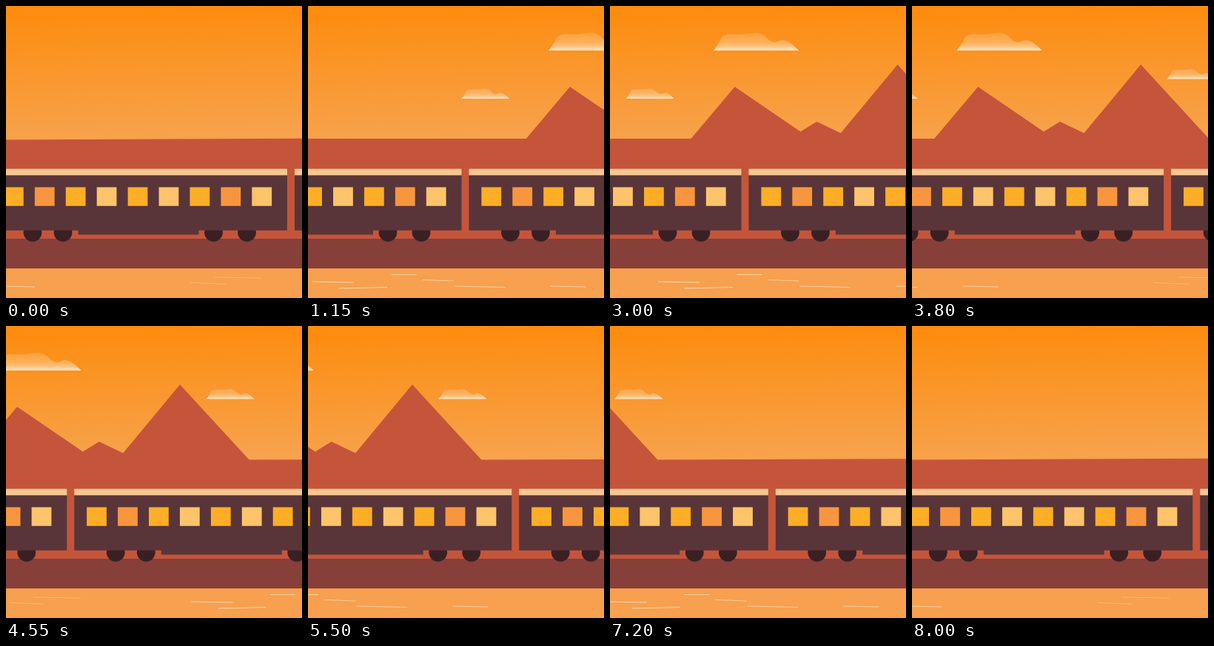
Animation of 400 by 394 pixels, one loop 8.05 s. Source, as an HTML page with a canvas:

```html
<!DOCTYPE html>
<html lang="en">
<head>
<meta charset="utf-8">
<title>Train at sunset</title>
<style>
html, body { margin: 0; width: 100%; height: 100%; overflow: hidden; background: #f7a04f; }
canvas { display: block; width: 400px; height: 394px; }
</style>
</head>
<body>
<canvas id="stage"></canvas>
<script>
const W = 400, H = 394, LOOP = 8050, STEP = 50, SPAN = 8000;
const CAR = 410, STREAK_SPAN = 826;
const canvas = document.getElementById('stage');
const ctx = canvas.getContext('2d');
const dpr = window.devicePixelRatio || 1;
canvas.width = W * dpr;
canvas.height = H * dpr;
ctx.scale(dpr, dpr);

// Corners of the two mountains, joined by straight lines
const RIDGE = [[0, 179], [410.7, 179], [469.8, 109], [558.6, 169.5], [580.6, 156],
  [613, 171.5], [689.8, 79], [783.3, 180.6], [1200, 178.8]];

// Outline of a cloud, smoothed when drawn
const PUFF = [[8, -10], [13, -23], [40, -21], [64, -26], [80, -8], [98, -18]];

const SKY = fade(0, 0, 5, 181, ['#fd8b0c', '#f7a24c']);
const MIST = fade(0, -24, 0, 0, [0.2, 0.25, 0.32, 0.5, 0.98].map(a => `rgba(255,236,208,${a})`));
const GLASS = { y: '#fdae26', o: '#f7963f', p: '#fdc46c' };

function fade(x1, y1, x2, y2, colors) {
  const g = ctx.createLinearGradient(x1, y1, x2, y2);
  colors.forEach((color, i) => g.addColorStop(i / (colors.length - 1), color));
  return g;
}

function box(x, y, w, h, color) {
  ctx.fillStyle = color;
  ctx.fillRect(x, y, w, h);
}

// The pace sways a little around uniform speed; the loop opens on its closing pose
function sceneTime(t) {
  return t ? t + 14 * Math.sin((t - 330) / SPAN * 2 * Math.PI) : SPAN;
}

function drawCloud(x, y, size) {
  ctx.save();
  ctx.translate(x, y);
  ctx.scale(size, size);
  ctx.beginPath();
  ctx.moveTo(0, 0);
  PUFF.forEach(([px, py], i) => {
    const [nx, ny] = PUFF[i + 1] || [115.5, 0];
    const end = i === PUFF.length - 1 ? 1 : 0.5;
    ctx.quadraticCurveTo(px, py, px + (nx - px) * end, py + (ny - py) * end);
  });
  ctx.closePath();
  ctx.fillStyle = MIST;
  ctx.fill();
  ctx.restore();
}

function drawRidge(shift) {
  ctx.beginPath();
  ctx.moveTo(0, 320);
  RIDGE.forEach(([x, y]) => ctx.lineTo(x - shift, y));
  ctx.lineTo(W + 10, 320);
  ctx.closePath();
  ctx.fillStyle = '#c4553a';
  ctx.fill();
}

function drawCar(x) {
  ctx.fillStyle = '#3a2024';
  for (const dx of [56, 97, 300.5, 345.5]) {
    ctx.beginPath();
    ctx.arc(x + dx, 305.6, 12.4, 0, Math.PI * 2);
    ctx.fill();
  }
  box(x, 228, 400, 74.8, '#593539');
  box(x + 117.5, 302, 163, 6.5, '#593539');
  box(x, 219.7, 400, 8.7, '#f9c592');
  [...'yoypypyop'].forEach((key, i) => box(x + 16.9 + i * 41.93, 244.5, 26.8, 25.3, GLASS[key]));
}

function streak(x, y, length, rise, alpha) {
  ctx.strokeStyle = `rgba(255,236,205,${alpha})`;
  ctx.beginPath();
  ctx.moveTo(x, y);
  ctx.lineTo(x + length, y + rise);
  ctx.stroke();
}

function drawStreaks(x) {
  streak(x, 373.3, 48, 2, 0.3);
  streak(x + 33, 366, 64, 1, 0.3);
  streak(x + 246.5, 372, 56, 1, 0.8);
  streak(x + 282.5, 381, 65, -1.5, 0.8);
  streak(x + 353, 362.5, 34, 0, 0.7);
  streak(x + 395, 369.5, 42, 1.5, 0.6);
  streak(x + 438, 378, 69, 1.5, 0.6);
  streak(x + 568, 378, 48, 1, 0.6);
}

function draw(t) {
  const drift = t * 0.1;
  box(0, 0, W, H, SKY);
  drawCloud(441 - drift, 60, 1);
  drawCloud(323 - drift, 125, 0.563);
  drawCloud(725.3 - drift, 98.5, 0.563);
  drawRidge(drift);
  box(0, 314, W, 40.5, '#873f39');

  const car = (390 + t * 0.205) % CAR;
  drawCar(car - CAR);
  drawCar(car);

  box(0, 354.2, W, 40, '#f7a04f');
  const streaks = 223 - (t % 2000 || 2000) * 0.4;
  drawStreaks(streaks);
  drawStreaks(streaks + STREAK_SPAN);
}

const start = performance.now();
function tick() {
  const t = (performance.now() - start) % LOOP;
  draw(sceneTime(Math.floor(t / STEP) * STEP));
  requestAnimationFrame(tick);
}
tick();
</script>
</body>
</html>
```
